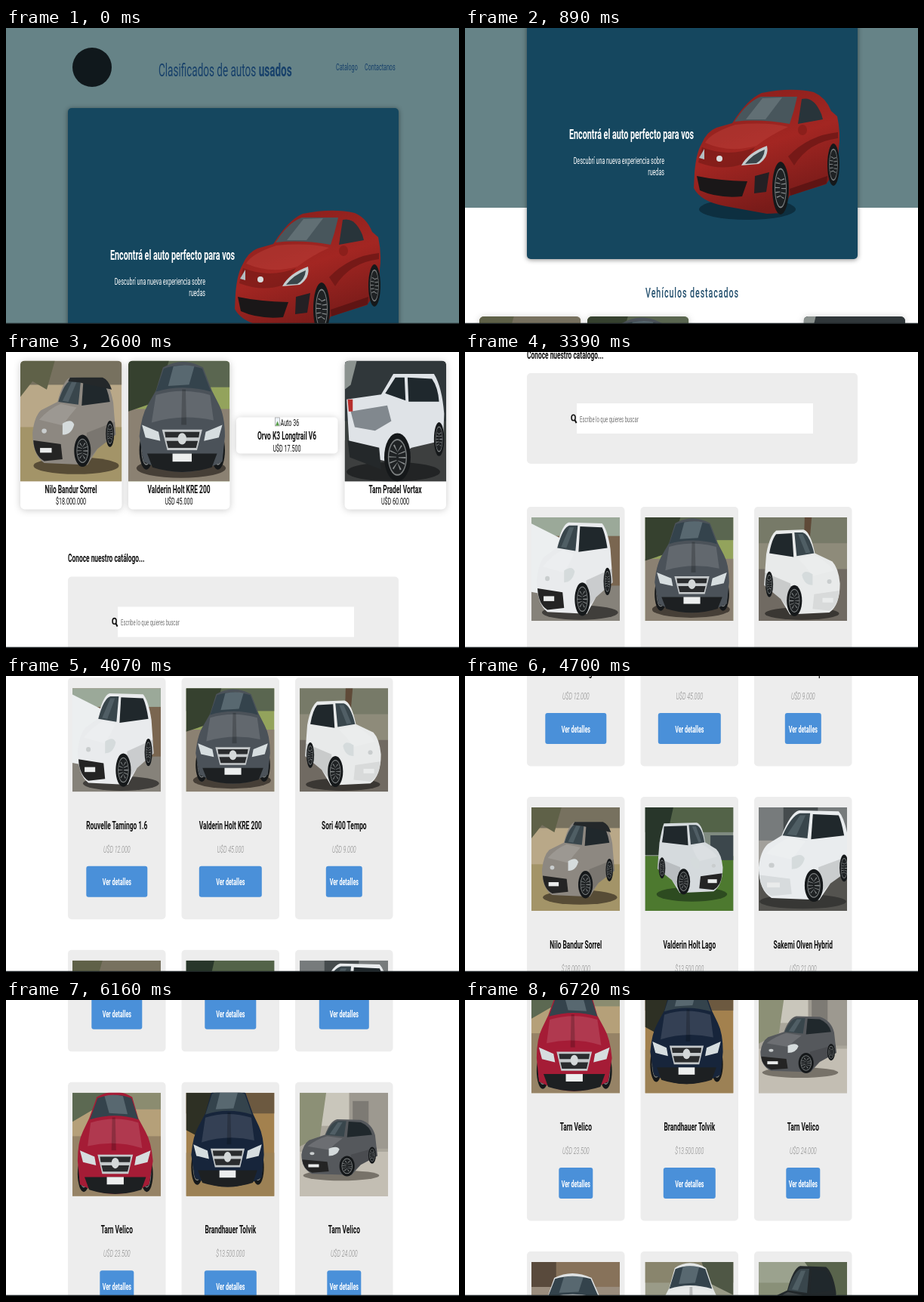
Animation of 600 by 392 pixels, one loop 6820 ms. Source, as an HTML page:

```html
<!DOCTYPE html>
<html lang="es">
<head>
<meta charset="utf-8">
<style>
html, body { margin: 0; width: 100%; height: 100%; overflow: hidden; background: #fff; }
#stage { display: block; width: 600px; height: 392px; font-family: Roboto, sans-serif; }
.card { fill: #fff; filter: drop-shadow(0 1px 5px #0003); }
.b { font-weight: 700; }
.price { font-weight: 300; font-style: italic; fill: #888; }
</style>
</head>
<body>
<svg id="stage" viewBox="0 0 600 392"><g id="page"></g><rect y="390.7" width="600" height="1.3" fill="#1b2124"/></svg>
<script>
const rect = (x, y, w, h, fill, r = 0, more = '') =>
  `<rect x="${x}" y="${y}" width="${w}" height="${h}" rx="${r}" fill="${fill}" ${more}/>`;
const path = (fill, d) => `<path fill="${fill}" d="${d}"/>`;
const oval = (x, y, rx, ry, fill, more = '') =>
  `<ellipse cx="${x}" cy="${y}" rx="${rx}" ry="${ry}" fill="${fill}" ${more}/>`;
// The dashed ring draws the spokes.
const wheel = (x, y, rx, ry) =>
  oval(x, y, rx, ry, '#15181a') + oval(x, y, rx * .72, ry * .76, '#7d8182') + oval(x, y, rx * .64, ry * .7, '#1f2224') +
  oval(x, y, rx * .36, ry * .38, 'none', `stroke="#8b8f90" stroke-width="${rx * .55}" stroke-dasharray="2 8" pathLength="100"`);

// The whole page is squeezed to the stage, so all text shares one scale.
const text = (x, y, size, str, fill = '#111', more = '') =>
  `<text transform="matrix(.448 0 0 .8 ${x} ${y})" font-size="${size}" fill="${fill}" ${more}>${str}</text>`;
const centered = (x, y, size, str, fill, more = '') => text(x, y, size, str, fill, 'text-anchor="middle" ' + more);

const place = (x, y, w, h, flip, art) =>
  `<g transform="translate(${flip ? x + w : x} ${y}) scale(${(flip ? -w : w) / 100} ${h / 100})">${art}</g>`;

// Three-quarter view facing left; a = windscreen foot, b = roof front, c = roof rear.
const angled = (body, x, y, w, h, { flip, a = 33, b = 50, c = 84, trim = '#242424' } = {}) => place(x, y, w, h, flip,
  path(body, `M0 60Q2 43 10 36L${a} 27Q${b - 9} 3 ${b} 1L${c} 2Q93 8 97 28L100 62L78 77L66 94L14 92Q0 84 0 60Z`) +
  path('#39464c', `M${a + 1} 27Q${b - 8} 6 ${b + 1} 4L${b + 12} 4L${b + 9} 30Z`) +
  path('#8fa0a844', `M${a + 6} 26L${b + 1} 6L${b + 7} 6L${b - 3} 27Z`) +
  path('#20282c', `M${b + 13} 31L${b + 15} 5L${c} 6Q90 12 93 27Z`) +
  path('#ffffff22', `M8 46Q20 34 34 29L${b + 7} 33Q44 42 36 52Z`) +
  path('#0002', 'M65 60L99 48L100 62L78 77L66 90Z') +
  path(trim, 'M1 68L34 72L36 88L14 90Q2 84 1 68Z') +
  path('#d5dbdc', 'M36 50Q47 44 50 51Q47 62 36 62Z') +
  oval(14, 58, 3, 2.5, '#c9cdce') + rect(9, 76, 14, 5, '#e9ebeb') +
  wheel(60, 79, 10, 17) + wheel(93, 61, 5, 14));

const front = (body, x, y, w, h, flip) => place(x, y, w, h, flip,
  wheel(9, 78, 8, 17) + wheel(91, 78, 8, 17) +
  path(body, 'M1 66Q3 48 11 38L20 26L28 6Q50-4 74 6L84 26L92 38Q99 48 99 66L96 88Q50 106 6 88Z') +
  path('#34434c', 'M20 27L29 7Q50 1 73 7L83 27Q50 20 20 27Z') +
  path('#9fb0b855', 'M34 22L40 5Q54 3 64 5L58 21Z') +
  path('#ffffff20', 'M20 30Q50 23 82 30L86 52Q50 46 15 54Z') +
  path('#0003', 'M50 25L54 25L55 56L49 56Z') +
  path('#d6dddf', 'M4 56L23 62L25 70L8 67ZM96 56L77 62L75 70L92 67Z') +
  path('#c4c8ca', 'M27 60L73 60L67 78L33 78Z') +
  path('#2a2c2e', 'M30 62L70 62L69 67L31 67ZM32 70L68 70L66 76L34 76Z') +
  path('#1d2022', 'M10 81L90 81L84 93Q50 101 16 93Z') +
  oval(50, 68, 5, 5, '#d4d8d9') + rect(39, 81, 22, 7, '#eceeee'));

const scene = (sky, wall, ground, y1, y2) =>
  rect(0, 0, 100, 100, wall) + rect(0, 0, 100, y1, sky) + rect(0, y2, 100, 100 - y2, ground);

const photos = {
  hatch: scene('#77715f', '#b9a888', '#a39468', 20, 55) + path('#5f6148', 'M0 0H34L26 24L12 17L0 30Z') +
    oval(55, 87, 42, 7, '#574c36') + angled('#8d8881', 12, 13, 82, 78, { a: 30, b: 46 }) +
    path('#24282a', 'M49 14L81 14Q87 16 90 24L58 18L47 17Z'),
  suv: scene('#5a6650', '#93a35c', '#8b8172', 22, 40) + path('#36412f', 'M0 0H40L28 34L0 42Z') +
    oval(52, 89, 44, 8, '#463f37') + front('#4b5259', 10, 0, 86, 95),
  pickup: scene('#30373a', '#3b413f', '#3d3f3f', 50, 66) + path('#8b928f', 'M0 0H12L6 20L0 24Z') +
    oval(48, 92, 46, 8, '#222425') +
    path('#dfe3e7', 'M2 32L36 28L48 11L88 11Q96 22 98 44L97 66L66 72L44 84L5 76Z') +
    path('#1f282d', 'M40 27L50 14L59 14L60 33ZM63 34L62 14L86 15Q92 22 93 34Z') +
    path('#81888e', 'M6 42L42 37L46 50L30 58L10 55Z') + path('#24282a', 'M3 66L34 72L36 90L5 80Z') +
    path('#b72e2c', 'M3 32L8 32L8 42L4 42Z') + wheel(52, 80, 13, 20) + wheel(93, 65, 5, 14),
  van: scene('#9ba999', '#7a6650', '#86827a', 18, 66) + path('#eceff0', 'M0 6L42 24L36 78L0 72Z') +
    oval(55, 92, 43, 7, '#403e3b') + angled('#e9ebed', 6, 4, 86, 95, { a: 26, b: 42, c: 86 }),
  mini: scene('#777a68', '#8e8b7a', '#706a62', 25, 50) + path('#5f4a38', 'M52 0H60L57 30H51Z') +
    oval(49, 93, 42, 6, '#3a3733') + angled('#e8eaea', 6, 11, 86, 88, { flip: true, trim: '#d8dada', b: 48 }),
  minibus: scene('#536348', '#7f8a80', '#4d792f', 24, 47) + path('#28362a', 'M0 0H32L20 46H0Z') +
    rect(74, 27, 26, 24, '#3c474c') + oval(53, 84, 40, 7, '#2d4b20') +
    angled('#d5dadd', 14, 14, 74, 73, { flip: true, a: 27, b: 40, c: 90 }),
  liftback: scene('#777b7c', '#a2a09b', '#54534f', 32, 62) + path('#454b4d', 'M28 0H67V32H28Z') +
    oval(50, 91, 49, 7, '#373735') + angled('#e9ecee', 0, 2, 104, 93, { a: 25, b: 44, c: 87, trim: '#d7dbdd' }),
  red: scene('#8b8c70', '#b5a079', '#968366', 16, 42) + path('#5c6952', 'M0 0H42L24 16L0 28Z') +
    front('#a51c36', 5, -2, 87, 103, true),
  truck: scene('#6c5940', '#a3814e', '#9c8155', 20, 58) + path('#2e3024', 'M0 0H34L22 46L0 36Z') +
    front('#17253b', 5, -6, 84, 100),
  sedan: scene('#c9c6bb', '#aaa69b', '#c3beb3', 32, 57) + path('#8c9076', 'M0 0H30L23 42L0 52Z') +
    rect(56, 0, 44, 54, '#9d9990') + rect(60, 8, 18, 40, '#7d7a74') +
    oval(47, 80, 43, 5, '#777269') + angled('#55585c', 2, 25, 86, 58, { a: 31, b: 47, c: 78 }),
  white: scene('#87725a', '#9a8d7e', '#76716a', 24, 65) + path('#594a3c', 'M0 0H28V24H0Z') +
    front('#dfe2e3', 0, 10, 92, 90),
  wagon: scene('#89856d', '#9a9b88', '#77786f', 20, 65) + path('#4f5745', 'M64 0H100V32L72 20Z') +
    front('#e3e6e6', 12, 0, 77, 96),
  black: scene('#9ba28e', '#899078', '#77756b', 20, 65) + path('#59644c', 'M52 0H100V38L70 22Z') +
    angled('#22282b', 4, 3, 86, 90, { b: 50 }),
};
const photo = (name, x, y, w, h) =>
  `<svg x="${x}" y="${y}" width="${w}" height="${h}" viewBox="0 0 100 100" preserveAspectRatio="none">${photos[name]}</svg>`;

const navy = '#17406a';
const header =
  rect(0, 0, 600, 398, '#668387') + `<circle cx="114" cy="52" r="26" fill="#10181c"/>` +
  text(202, 64, 30.2, 'Clasificados de autos <tspan class="b">usados</tspan>', navy) +
  text(437, 56, 16, 'Catalogo', navy) + text(475, 56, 16, 'Contactanos', navy);

const coupe = `<g transform="translate(0 160)">` +
  oval(374, 240, 64, 14, '#0d2f40') +
  path('url(#paint)', 'M303 212L304 192Q306 166 313 154Q320 137 333 132L354 126Q374 94 393 86Q432 78 462 85Q478 92 485 110L493 117Q498 140 495 160L494 185L478 207L430 222L420 245L400 246L345 236Q312 230 303 212Z') +
  path('#48565c', 'M357 124Q374 97 392 91L440 91Q436 110 430 127Q390 120 357 124Z') +
  path('#87959a66', 'M372 121L394 93L420 92L398 121Z') +
  path('#28343a', 'M441 127L446 94Q462 90 472 114L474 121Z') +
  path('#bd403a77', 'M318 152Q325 139 358 128Q400 124 428 131Q404 142 386 156Q350 166 318 152Z') +
  path('#5a121166', 'M314 158Q350 172 384 158L368 180Q340 190 309 178Z') +
  path('#5f1413', 'M430 213L480 196L479 206L431 222Z') +
  path('#761917', 'M428 170Q455 142 494 138L494 146Q455 151 436 182Z') +
  path('#1a1718', 'M307 196Q335 202 374 203L367 223Q335 226 311 215Z') +
  path('#242024', 'M384 196L403 191L399 217L383 219Z') +
  path('#c4cdcf', 'M366 182Q375 165 400 156Q403 171 389 180Z') +
  path('#39454a', 'M371 180Q381 167 397 161Q396 173 386 179Z') +
  path('#b4bdc0', 'M310 172L317 160L317 174Z') +
  `<circle cx="337" cy="173" r="4" fill="#d8dcdd"/>` +
  oval(447, 135, 6, 7, '#8c1f1b') +
  wheel(418, 212, 11, 35) + wheel(488, 181, 8, 28) + '</g>';

const hero =
  rect(82, 106, 438, 360, '#15475f', 5, 'style="filter:drop-shadow(0 1px 3px #0007)"') +
  text(138, 307, 24, 'Encontrá el auto perfecto para vos', '#fff', 'class="b"') +
  ['Descubrí una nueva experiencia sobre', 'ruedas'].map((s, i) =>
    text(264, 340 + i * 15.4, 16, s, '#fff', 'text-anchor="end"')).join('') + coupe;

const topCard = (x, pic, name, price) =>
  rect(x, 542, 134.5, 197, '#fff', 6, 'class="card"') +
  `<clipPath id="c${x}">${rect(x, 542, 134.5, 170, '#000', 6)}</clipPath>` +
  `<g clip-path="url(#c${x})">${photo(pic, x, 542, 134.5, 160)}</g>` +
  centered(x + 67, 717.5, 18.72, name, '#111', 'class="b"') + centered(x + 67, 733, 16, price);

const featured =
  centered(301, 516.5, 24, 'Vehículos destacados', '#24506e', 'font-weight="500" letter-spacing="2"') +
  topCard(19, 'hatch', 'Nilo Bandur Sorrel', '$18.000.000') +
  topCard(162, 'suv', 'Valderin Holt KRE 200', 'U$D 45.000') +
  topCard(448.5, 'pickup', 'Tarn Pradel Vortax', 'U$D 60.000') +
  rect(305, 617, 134.5, 48, '#fff', 5, 'class="card"') +
  rect(356.5, 617.5, 6, 11, '#eef3fa', 0, 'stroke="#999" stroke-width=".7"') +
  path('#5a9e4b', 'M357 628L359.5 622L362 628Z') +
  text(363.5, 628.5, 16, 'Auto 36') +
  centered(372, 647, 18.72, 'Orvo K3 Longtrail V6', '#111', 'class="b"') +
  centered(372, 662.5, 16, 'U$D 17.500');

const search =
  text(82, 808.5, 18.72, 'Conoce nuestro catálogo...', '#111', 'class="b"') +
  rect(82, 828, 438, 120, '#ededed', 5) + rect(148, 868, 313, 40, '#fff') +
  '<g fill="none" stroke="#111"><ellipse cx="143.6" cy="887" rx="2.5" ry="3.8" stroke-width="1.6"/><path d="M145.4 890L147.6 894" stroke-width="2"/></g>' +
  text(152, 892.5, 13.33, 'Escribe lo que quieres buscar', '#757575');

// photo, name, price, button width
const stock = [
  ['van', 'Rouvelle Tamingo 1.6', 'U$D 12.000', 81],
  ['suv', 'Valderin Holt KRE 200', 'U$D 45.000', 83],
  ['mini', 'Sori 400 Tempo', 'U$D 9.000', 48],
  ['hatch', 'Nilo Bandur Sorrel', '$18.000.000', 67],
  ['minibus', 'Valderin Holt Lago', '$13.500.000', 68],
  ['liftback', 'Sakemi Olven Hybrid', 'U$D 21.000', 66],
  ['red', 'Tarn Velico', 'U$D 23.500', 45],
  ['truck', 'Brandhauer Tolvik', '$13.500.000', 69],
  ['sedan', 'Tarn Velico', 'U$D 24.000', 45],
  ['white', '', '', 60], ['wagon', '', '', 60], ['black', '', '', 60],
];
const catalog = stock.map(([pic, name, price, w], i) => {
  const x = 82 + i % 3 * 150.5, y = 1005 + Math.floor(i / 3) * 360.5, mid = x + 64.8;
  return rect(x, y, 129.5, 320, '#ededed', 5) + photo(pic, x + 6, y + 14, 117, 137) +
    centered(mid, y + 200.5, 18.72, name, '#111', 'class="b"') +
    centered(mid, y + 231.5, 16, price, '#888', 'class="price"') +
    rect(mid - w / 2, y + 249.5, w, 41, '#4a90d9', 3) +
    centered(mid, y + 275, 16, 'Ver detalles', '#fff', 'class="b"');
}).join('');

const page = document.getElementById('page');
page.innerHTML =
  '<linearGradient id="paint" x2=".4" y2="1"><stop stop-color="#841e1b"/><stop offset=".55" stop-color="#a32622"/><stop offset="1" stop-color="#781b19"/></linearGradient>' +
  header + hero + featured + search + catalog;

// Scrolling advances in discrete ticks: [first, last, count] in ms.
const ticks = [
  [110, 790, 8], [890, 1560, 8], [1660, 1850, 3], [1950, 2050, 2], [2210, 2790, 8], [2910, 3580, 8],
  [3670, 4340, 8], [4450, 4700, 4], [4800, 4800, 1], [4980, 5590, 8], [5740, 6360, 8], [6520, 6720, 3],
].flatMap(([from, to, n]) => Array.from({ length: n }, (_, i) => from + (to - from) * i / Math.max(1, n - 1)));

// [tick, scroll offset]
const stops = [[0, 0], [9, 160], [19, 321], [35, 800], [49, 1205.5], [58, 1503.5], [69, 1753.5]];
const scrollAt = tick => {
  const k = Math.max(1, stops.findIndex(s => s[0] >= tick));
  const [a, from] = stops[k - 1], [b, to] = stops[k];
  return from + (to - from) * (tick - a) / (b - a);
};

const LOOP = 6820;
function draw() {
  const t = performance.now() % LOOP;
  const tick = ticks.filter(at => at <= t).length;
  page.setAttribute('transform', `translate(0 ${-scrollAt(tick)})`);
  requestAnimationFrame(draw);
}
draw();
</script>
</body>
</html>
```
